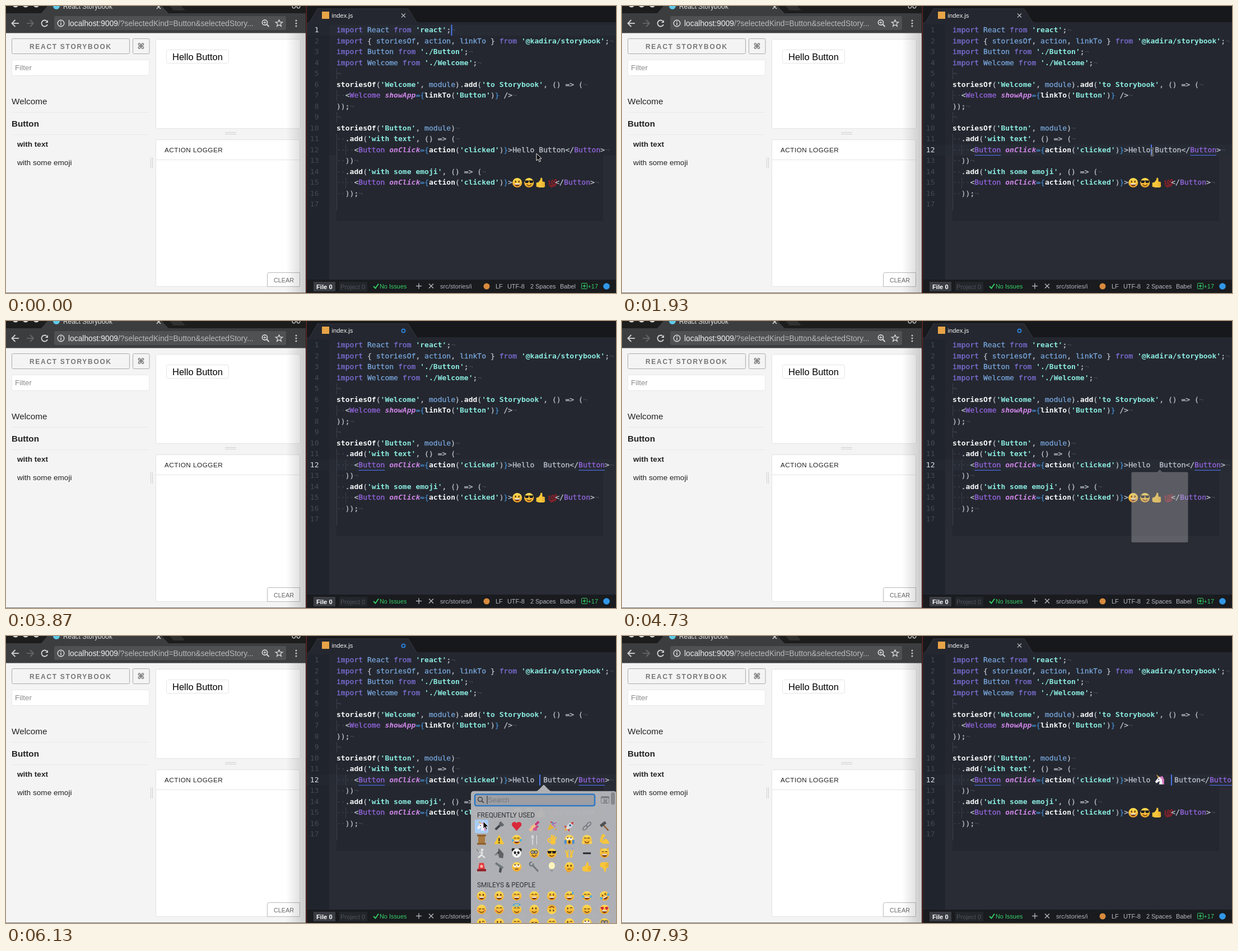
Animation, 1089 px wide and 514 px high, one loop 8000 ms. Source, as an HTML page with a canvas:

```html
<!DOCTYPE html>
<html>
<head>
<meta charset="utf-8">
<style>
html, body { margin: 0; width: 100%; height: 100%; overflow: hidden; background: #24272f; }
canvas { display: block; }
</style>
</head>
<body>
<canvas id="stage" width="1089" height="514"></canvas>
<script>
const g = document.getElementById('stage').getContext('2d');
const SANS = '"Liberation Sans", Arial, sans-serif';
const MONO = '"DejaVu Sans Mono", monospace';
const LOOP = 8000, CHAR = 7.855, ROW = 19.53;
const CLICK = 700, TYPE = 2550, OPEN = 4600, FILL = 5250, PICK = 7200, SPACE = 7600, SAVE = 7750;
const clamp = v => Math.max(0, Math.min(1, v));
const ease = v => { v = clamp(v); return v * v * (3 - 2 * v); };

// ---- drawing helpers
function rect(x, y, w, h, fill, stroke, r = 0) {
  g.beginPath();
  g.roundRect(x, y, w, h, r);
  if (fill) { g.fillStyle = fill; g.fill(); }
  if (stroke) { g.strokeStyle = stroke; g.lineWidth = 1; g.stroke(); }
}
function dot(x, y, r, c, ry = r) {
  g.beginPath();
  g.ellipse(x, y, r, ry, 0, 0, 7);
  g.fillStyle = c;
  g.fill();
}
function arc(x, y, r, a, b, c, w = 1.2) {
  g.beginPath();
  g.arc(x, y, r, a, b);
  g.strokeStyle = c; g.lineWidth = w;
  g.stroke();
}
function trace(pts) {
  g.beginPath();
  for (let i = 0; i < pts.length; i += 2) g.lineTo(pts[i], pts[i + 1]);
}
function line(c, w, ...pts) {
  trace(pts);
  g.strokeStyle = c; g.lineWidth = w;
  g.stroke();
}
function poly(c, ...pts) {
  trace(pts);
  g.fillStyle = c;
  g.fill();
}
function text(s, x, y, size, c, style = '', family = SANS, gap = 0) {
  g.font = `${style} ${size}px ${family}`;
  g.letterSpacing = gap + 'px';
  g.fillStyle = c;
  g.fillText(s, x, y);
}
function place(x, y, angle, draw) {
  g.save();
  g.translate(x, y);
  g.rotate(angle);
  draw();
  g.restore();
}

// ---- emoji, each within -9..9
const INK = '#5a3510', SKIN = '#f7c53b', RED = '#d8283a', STEEL = '#70777d';

// look = eyes, mouth, then optional extras
function face(look) {
  const [eyes, mouth] = look;
  const has = c => look.indexOf(c, 2) > 0;
  const skin = g.createLinearGradient(0, -9, 0, 9);
  skin.addColorStop(0, '#ffdf55');
  skin.addColorStop(1, '#f2a426');
  if (has('r')) g.rotate(Math.PI);
  if (has('l')) g.rotate(-.5);
  if (has('e')) { poly('#eeb030', -8, -2, -7, -10, -1, -6); poly('#eeb030', 8, -2, 7, -10, 1, -6); }
  dot(0, 0, 8.5, skin);
  for (const s of [-1, 1]) {
    const x = 3 * s;
    if (eyes == 'o') dot(x, -2, 1.2, INK, 1.8);
    if (eyes == '^') arc(x, -1.4, 1.9, 3.4, 6, INK);
    if (eyes == '_') arc(x, -2.6, 1.9, .3, 2.8, INK);
    if (eyes == '>') line(INK, 1.2, x + s, -4, x - s, -2.2, x + s, -.6);
    if (eyes == ';') s < 0 ? dot(x, -2, 1.2, INK, 1.8) : arc(x, -1.4, 1.9, 3.4, 6, INK);
    if (eyes == 'h') { dot(4 * s - 1, -3, 1.9, RED); dot(4 * s + 1, -3, 1.9, RED); poly(RED, 4 * s - 2.8, -2.6, 4 * s + 2.8, -2.6, 4 * s, 1.5); }
    if (eyes == 's') poly('#1d1d20', 0, -4, 8 * s, -4, 6.5 * s, .5, 1.5 * s, .5);
    if (eyes == 'g' || eyes == 'u') { dot(x, -2, 2.7, '#fff'); dot(x, eyes == 'u' ? -3.4 : -2, 1.2, INK); }
    if (eyes == 'g') arc(x, -2, 2.8, 0, 7, '#333');
    if (has('t')) dot(7 * s, 1, 1.9, '#45aeea', 2.6);
    if (has('b')) dot(5.5 * s, 2, 1.7, '#ee7a4a');
    if (has('k')) dot(6.5 * s, 5, 2.7, '#ffd34f');
    if (has('f')) dot(7 * s, 4, 2.2, '#4f8fd0', 4);
  }
  if (mouth == 'D') {
    g.beginPath(); g.arc(0, 1.5, 5, 0, Math.PI); g.fillStyle = '#7a3a16'; g.fill();
    rect(-4.4, 1.5, 8.8, 1.8, '#fff');
  }
  if (mouth == ')') arc(0, .8, 4.5, .5, 2.65, INK, 1.3);
  if (mouth == '-') line(INK, 1.3, -3, 4, 3, 4);
  if (mouth == 'O') dot(0, 4, 2, INK, 3);
  if (mouth == '*') { arc(0, 4, 1.4, -1.5, 1.5, INK); dot(5, 4, 2, RED); }
  if (has('n')) { g.beginPath(); g.ellipse(0, -8, 6, 2, 0, 0, 7); g.strokeStyle = '#3fa4e4'; g.lineWidth = 1.6; g.stroke(); }
  if (has('w')) dot(6, -5, 1.7, '#45aeea', 2.5);
  if (has('q')) { dot(-2, 7, 3, '#eba52c'); line('#eba52c', 2, -2, 7, 3, 4.5); }
}
function thumb() {
  poly(SKIN, -8, 0, -4, -1, -1, -5, 0, -9, 2.5, -8.5, 3, -2, 7, -1.5, 7.5, 7, 5, 8.5, -3, 8.5, -8, 7);
  for (const y of [.8, 3.2, 5.6]) line('#d9952a', .8, 2, y, 7.5, y);
}
const objects = {
  unicorn() {
    poly('#f4f1f6', -8, 3, -2, -5, 4, -6, 7, 8, -1, 8, 0, 2, -6, 6);
    poly('#d879c2', 0, -5, 5, -7, 8, -1, 8, 8, 5, 8, 4, -1);
    poly('#e6a94e', -3, -4, -6, -10, 0, -5);
    dot(-2, -1, 1, '#4a3550');
  },
  torch() { place(0, 0, -.75, () => { rect(-9, -2, 11, 4, '#43474b', null, 1); poly('#62676b', 1, -2, 5, -4.5, 8, -4.5, 8, 4.5, 5, 4.5, 1, 2); }); },
  heart() { dot(-4, -3, 4.6, RED); dot(4, -3, 4.6, RED); poly(RED, -8.2, -1, 0, -3, 8.2, -1, 0, 8.5); },
  polish() { line('#f0bd8c', 5.5, -8, 8, 2, -1); line('#f0bd8c', 3, -6, 2, 5, -5); line('#c9387c', 4, 2, -2, 8, -8); line('#c9387c', 3, 2, 3, 7, 0); rect(-2, 3, 7, 5, '#d65594', null, 1); },
  party() {
    poly('#e3b53b', -8, 8, -3, -4, 4, 3);
    ['#d44', '#47b', '#4a5', '#d5a', '#e92'].forEach((c, i) => dot(-1 + i * 2, -7 + i * i * .8, 1.4, c));
    line('#bd55c5', 1.5, 0, -1, 4, -5, 8, -6);
  },
  rocket() { place(0, 0, .78, () => { poly('#d24540', -7, 7, 0, -2, 7, 7); dot(0, -1, 4, '#d5dade', 8.5); poly('#c83737', -3.2, -6, 0, -10.5, 3.2, -6); dot(0, -2, 2, '#3c6f9c'); poly('#f6a92c', -2.5, 7, 2.5, 7, 0, 12); }); },
  link() { place(0, 0, -.78, () => { for (const x of [-4.5, 4.5]) { g.beginPath(); g.ellipse(x, 0, 4.8, 2.6, 0, 0, 7); g.strokeStyle = STEEL; g.lineWidth = 1.6; g.stroke(); } }); },
  hammer() { line('#8b5a34', 2.5, -3, -3, 7, 8); line('#4c5052', 5, -7, 0, 2, -7); },
  scroll() { rect(-6, -7, 12, 14, '#a9793f'); rect(-8, -9, 16, 3, '#8b5d2b', null, 1); rect(-8, 6, 16, 3, '#8b5d2b', null, 1); },
  warning() { poly('#f8c631', 0, -9, 9, 8, -9, 8); line('#222', 2, 0, -3, 0, 3); dot(0, 5.5, 1.2, '#222'); },
  cutlery() { line('#d9dadc', 1.8, -3, -1, -3, 9); line('#d9dadc', 3.6, -3, -8, -3, -2); line('#8d9094', 1.4, 3, -8, 3, 9); line('#d9dadc', 1.6, 4, -8, 4, 9); },
  okay() {
    for (const [x, y] of [[0, -9], [4, -8], [8, -5]]) line(SKIN, 2.8, x / 2, 3, x, y);
    dot(2, 4, 4.8, SKIN);
    arc(-3.5, 1, 3.3, 0, 7, SKIN, 2.4);
  },
  muscle() { line(SKIN, 4.5, -3, -7, -6, 2, -2, 5, 8, 5); dot(2, 3, 4.3, SKIN); dot(-2, -7, 3, SKIN); },
  fencer() { dot(1, -6, 2.4, '#e6e6e6'); line('#e6e6e6', 3, 1, -3, 0, 3, -6, 8); line('#e6e6e6', 2.5, 0, 3, 6, 8); line('#ddd', 1.6, 1, -2, -5, -2); line('#555', .8, -5, -2, -9, -8); },
  wolf() { poly('#5e6264', -9, 4, -2, -3, -1, -9, 3, -5, 8, 1, 7, 9, 0, 8, -1, 4); poly('#939799', -9, 4, -2, 0, 0, 4); dot(-1, -1, .9, '#111'); },
  panda() {
    for (const s of [-1, 1]) dot(6 * s, -6, 3, '#222');
    dot(0, 0, 8, '#f6f6f6');
    for (const s of [-1, 1]) dot(3 * s, -1, 2.1, '#222', 2.7);
    dot(0, 3, 1.6, '#222', 1);
  },
  raise() { for (const s of [-1, 1]) { line(SKIN, 4, 3 * s, 8, 4 * s, 0); line(SKIN, 2, 3 * s, 0, 2 * s, -6); line(SKIN, 2, 5 * s, 0, 7 * s, -6); line('#4d8bd0', 1, 5 * s, -7, 6 * s, -9); } },
  minus() { rect(-7, -1.5, 14, 3, '#27292b'); },
  siren() { poly('#e5383c', -6, 5, -4, -7, 4, -7, 6, 5); rect(-8, 4, 16, 4, '#8d2026'); dot(0, -1, 2.6, '#ffb5a8'); },
  pistol() { place(0, 0, .6, () => { rect(-9, -4, 16, 4, STEEL); poly('#4b5054', 1, 0, 6, 0, 9, 7, 5, 8); }); },
  wrench() { line(STEEL, 3, -3, -3, 7, 8); arc(-5, -5, 3.3, -.3, 5, STEEL, 2.3); },
  bulb() { dot(0, -2, 5.5, '#fff4bd', 6.5); rect(-2.5, 4, 5, 4.5, '#9b9ea0', null, 1); },
  up: thumb,
  down() { g.rotate(Math.PI); g.scale(-1, 1); thumb(); },
  hundred() { place(0, 0, -.2, () => { text('100', -8.5, 2, 10, '#b01f29', 'bold italic'); line('#b01f29', 1.6, -7, 4.5, 7, 3.5); line('#b01f29', 1.4, -5, 7, 5, 6); }); }
};
function emoji(name, x, y) {
  place(x, y, 0, () => objects[name] ? objects[name]() : face(name));
}
const frequent = `unicorn torch heart polish party rocket link hammer
scroll warning ^Dt cutlery okay uOf ^)k muscle
fencer wolf panda g)x s) raise minus ^De
siren pistol u- wrench bulb o-q up down`.split(/\s/);
const smileys = `oD oD ^D ^Dx >D ^Dw ^Dt >Dtl
_)b ^)b ^)n o) o)r ;) _) hD
;* o* ^* _* ^)b ;D uD g)`.split(/\s/);

// ---- code: segments split by |, first letter picks the ink
const ink = {
  k: '#7b70d8', v: '#78a6dc', p: '#bcc2cc', s: '#8aeae0', f: '#f7f8fa', t: '#9466e0',
  a: '#cf86e8', b: '#4387c9', w: '#414754'
};
const weight = { f: 'bold', s: 'bold', a: 'italic bold' };
const imports = (name, from) => `kimport |v${name} |kfrom |s'${from}'|p;`;
const OPEN_TAG = "w····|p<|tButton |aonClick|b={|faction|p(|s'clicked'|p)|b}|p>";
const CLOSE_TAG = '|p</|tButton|p>';
const code = [
  imports('React', 'react'),
  "kimport |p{ |vstoriesOf|p, |vaction|p, |vlinkTo |p} |kfrom |s'@kadira/storybook'|p;",
  imports('Button', './Button'),
  imports('Welcome', './Welcome'),
  '',
  "fstoriesOf|p(|s'Welcome'|p, |vmodule|p).|fadd|p(|s'to Storybook'|p, () => (",
  "w··|p<|tWelcome |ashowApp|b={|flinkTo|p(|s'Button'|p)|b}|p />",
  'p));',
  '',
  "fstoriesOf|p(|s'Button'|p, |vmodule|p)",
  "w··|p.|fadd|p(|s'with text'|p, () => (",
  '',
  'w··|p))',
  "w··|p.|fadd|p(|s'with some emoji'|p, () => (",
  OPEN_TAG + '|eoD s) up hundred' + CLOSE_TAG,
  'w··|p));'
];
function codeLine(src, n, underline) {
  let x = 590;
  const y = 47 + n * ROW;
  for (const part of src.split('|')) {
    const kind = part[0], s = part.slice(1);
    if (kind == 'e') {
      const names = s.split(' ');
      names.forEach((name, i) => emoji(name, x + 8.5 + 21 * i, y - 4));
      x += 19 * names.length;
      continue;
    }
    if (!kind) continue;
    text(s, x, y, 13.05, ink[kind], weight[kind], MONO);
    if (!weight[kind] && kind != 'w') {
      // a hairline gives the plain text its medium weight
      g.strokeStyle = ink[kind]; g.lineWidth = .3;
      g.strokeText(s, x, y);
    }
    if (underline && kind == 't') rect(x, y + 5, s.trim().length * CHAR, 1.2, '#4a68dc');
    x += s.length * CHAR;
  }
  if (n < 16) text('¬', x, y, 13.05, ink.w, '', MONO);
}

// ---- browser window
function browser() {
  rect(0, 0, 536, 514, '#f4f4f4');
  rect(0, 0, 536, 14, '#1d1d1e');
  poly('#3c3d3f', 62, 14, 74, 0, 278, 0, 291, 14);
  poly('#303031', 292, 0, 313, 0, 320, 8, 299, 8);
  rect(0, 13, 536, 35.5, '#3c3d3f');
  for (const x of [17, 35, 54]) dot(x, -3, 5.5, '#d8d8d8');
  dot(90, 0, 6, '#5fc9e8');
  text('React Storybook', 102, 5, 11.9, '#e2e2e2');
  line('#ddd', 1.4, 269, -2, 276, 5);
  line('#ddd', 1.4, 276, -2, 269, 5);
  arc(514, 1, 2.8, 0, 7, '#ddd');
  arc(522, 1, 2.8, 0, 7, '#ddd');
  line('#d4d4d4', 1.8, 23, 31, 11, 31);
  line('#d4d4d4', 1.8, 16.5, 25, 10.5, 31, 16.5, 37);
  line('#666', 1.8, 37, 31, 49, 31);
  line('#666', 1.8, 43, 25, 49, 31, 43, 37);
  arc(69, 31, 5.5, .4, 5.4, '#d4d4d4', 1.8);
  poly('#d4d4d4', 70, 30, 75, 30, 75, 25);
  rect(86, 18, 414, 25, '#505153', null, 3);
  arc(98, 31, 5.8, 0, 7, '#ddd', 1.4);
  rect(97.2, 30, 1.6, 4.5, '#ddd');
  rect(97.2, 27, 1.6, 1.7, '#ddd');
  text('localhost:9009', 111, 35.5, 13.8, '#f0f0f0');
  text('/?selectedKind=Button&selectedStory...', 111 + 6.448 * 13.8, 35.5, 13.8, '#b9b9b9');
  arc(462, 29.5, 4.6, 0, 7, '#ddd', 1.6);
  line('#ddd', 2, 465.5, 33, 469.5, 37);
  line('#ddd', 1.1, 459.5, 29.5, 464.5, 29.5);
  line('#ddd', 1.1, 462, 27, 462, 32);
  const star = [];
  for (let i = 0; i <= 10; i++) {
    const r = i % 2 ? 2.8 : 6.5, a = i * Math.PI / 5;
    star.push(487.5 + r * Math.sin(a), 31 - r * Math.cos(a));
  }
  line('#ddd', 1.3, ...star);
  for (const y of [26, 31, 36]) dot(518, y, 1.5, '#c8c8c8');

  rect(10.5, 58.5, 210, 27, '#f4f4f4', '#ababab', 2);
  text('REACT STORYBOOK', 42, 77, 12, '#777', 'bold', SANS, 1.7);
  rect(226.5, 58.5, 29.5, 27, '#f4f4f4', '#ababab', 2);
  text('⌘', 234.5, 77, 14, '#666', 'bold', '"DejaVu Sans", sans-serif');
  rect(10.5, 96.5, 245, 28, '#fff', '#e9e9e9', 2);
  text('Filter', 16, 115, 13.5, '#8c8c8c');
  text('Welcome', 10, 176, 15.3, '#222');
  text('Button', 10, 216, 15.2, '#222', 'bold');
  text('with text', 20, 252, 13.56, '#222', 'bold');
  text('with some emoji', 20, 285, 13.6, '#222');
  rect(10, 190, 246, 1, '#e9e9e9');
  rect(10, 230, 246, 1, '#e9e9e9');
  for (const x of [258, 261]) rect(x, 271, 1, 20, '#cfcfcf');
  for (const y of [226, 229]) rect(391, y, 20, 1, '#cfcfcf');

  rect(267.5, 59.5, 258, 160, '#fff', '#e2e2e2', 3);
  rect(286.5, 78.5, 111, 24, '#fff', '#e4e4e4', 3);
  text('Hello Button', 297, 97, 16.5, '#000');
  rect(267.5, 239.5, 257, 263, '#fff', '#e2e2e2', 3);
  text('ACTION LOGGER', 283, 261.5, 11.8, '#222', '', SANS, .45);
  rect(268, 275, 256, 1, '#e5e5e5');
  rect(466.5, 477.5, 58, 25, '#fff', '#b9b9b9', [3, 0, 0, 0]);
  text('CLEAR', 478, 495, 10.8, '#666');
  const shade = g.createLinearGradient(500, 0, 536, 0);
  shade.addColorStop(0, '#0000');
  shade.addColorStop(1, '#0000002c');
  rect(500, 48, 36, 466, shade);
  rect(0, 513, 536, 1, '#777');
}

// ---- editor window
function editor(t) {
  const clicked = t >= CLICK, typed = t >= TYPE, picked = t >= PICK;
  const row = clicked ? 11 : 0, top = 33.5 + row * ROW;
  rect(536, 0, 553, 514, '#292b35');
  rect(577, 33, 512, 234, '#24272f');
  rect(590, 267, 476, 118, '#24272f');
  rect(537, 33, 40, 457, '#20242c');
  rect(537, 0, 552, 33, '#17181b');
  rect(537, 29, 552, 4, '#24272f');
  poly('#24272f', 542, 30, 556, 5, 718, 5, 733, 30);
  line('#383b42', 1, 542, 29, 556, 5, 718, 5, 733, 29);
  rect(564, 10, 13, 13, '#e7a447');
  text('index.js', 581.5, 20.5, 11.2, '#f3f3f3');
  if (typed && t < SAVE) arc(709.5, 17.5, 3, 0, 7, '#2a7cd4', 2);
  else { line('#b5b8bd', 1.3, 706, 13.5, 713, 20.5); line('#b5b8bd', 1.3, 713, 13.5, 706, 20.5); }

  rect(537, top, 40, ROW, '#222730');
  rect(577, top, 512, ROW, '#272b34');
  const guide = (x, a, b) => rect(x, 33.5 + a * ROW, 1, (b - a) * ROW, '#3a3f4a');
  guide(590, 4, 5); guide(590, 6, 7); guide(590, 8, 9); guide(590, 10, 17);
  guide(606, 11, 12); guide(606, 14, 15);
  g.textAlign = 'right';
  for (let i = 0; i < 17; i++) text(i + 1, 558.5, 47 + i * ROW, 13.05, i == row ? '#dfe2e7' : '#434955', '', MONO);
  g.textAlign = 'left';
  let body = '|pHello' + (typed ? ' ' : '');
  if (picked) body += '|eunicorn|p' + (t >= SPACE ? ' ' : '');
  code[11] = OPEN_TAG + body + ' Button' + CLOSE_TAG;
  code.forEach((src, i) => codeLine(src, i, clicked && i == 11));

  const since = t >= SPACE ? SPACE : picked ? PICK : typed ? TYPE : clicked ? CLICK : 0;
  if (Math.floor((t - since) / 412) % 2 == 0) {
    const x = t >= SPACE ? 980 : picked ? 972 : typed ? 952 : clicked ? 944 : 794.5;
    rect(x, top, 2, ROW, '#4a78ee');
  }

  rect(537, 490, 552, 24, '#191b1f');
  rect(549, 494, 39, 17, '#3a3d43');
  rect(595, 494, 50, 17, '#23262b');
  text('File 0', 554, 506.5, 11.2, '#fff', 'bold');
  text('Project 0', 597, 506.5, 11.2, '#50545b');
  line('#37d067', 1.8, 656, 502, 659.5, 505.5, 665, 497.5);
  text('No Issues', 667, 506, 10.9, '#37d067');
  line('#b4b7bc', 1.4, 732, 501.5, 742, 501.5);
  line('#b4b7bc', 1.4, 737, 496.5, 737, 506.5);
  line('#b4b7bc', 1.4, 755, 497.5, 763, 505.5);
  line('#b4b7bc', 1.4, 763, 497.5, 755, 505.5);
  text('src/stories/i', 775, 506, 11.2, '#aeb2b8');
  dot(858, 502, 5.5, '#d98a3c');
  [['LF', 874], ['UTF-8', 895], ['2 Spaces', 936], ['Babel', 989]].forEach(([s, x]) => text(s, x, 506, 10.9, '#b6bac0'));
  rect(1027.5, 496.5, 10, 10, null, '#37d067', 1);
  line('#37d067', 1.3, 1029.5, 501.5, 1035.5, 501.5);
  line('#37d067', 1.3, 1032.5, 498.5, 1032.5, 504.5);
  text('+17', 1038.5, 506, 10.9, '#37d067');
  dot(1072, 502, 5.8, '#3197e8');
  rect(535, 0, 1, 514, '#20191a');
  rect(536, 0, 1, 514, '#7a2a25');
}

// ---- emoji picker
function picker(t) {
  const grow = clamp((t - OPEN) / 337), fade = 1 - clamp((t - PICK) / 200);
  if (!grow || !fade) return;
  g.save();
  g.translate(960, 266);
  g.scale(grow, grow);
  g.translate(-960, -266);
  g.globalAlpha = .97 * grow * fade;
  g.beginPath();
  g.roundRect(830, 277.7, 260, 324, 5);
  g.moveTo(947, 278);
  g.quadraticCurveTo(950, 277, 958, 268);
  g.quadraticCurveTo(960, 265.5, 962, 268);
  g.quadraticCurveTo(970, 277, 973, 278);
  g.fillStyle = '#b4b5b9';
  g.fill();
  g.globalAlpha = fade * clamp((t - FILL) / 130);
  if (g.globalAlpha) {
    rect(836, 283, 215, 21, '#9d9fa4', null, 3);
    g.beginPath(); g.roundRect(837, 283.5, 214, 20.5, 3);
    g.strokeStyle = '#2e78c4'; g.lineWidth = 2.5; g.stroke();
    arc(846.5, 292.5, 3.8, 0, 7, '#333', 1.3);
    line('#333', 1.5, 849.5, 295.5, 853, 299);
    text('Search', 860.5, 298, 12, '#74777b');
    if (Math.floor((t - FILL) / 500) % 2) rect(858.5, 286, 1, 15, '#222');
    rect(1062.5, 287.5, 14, 12, null, '#777a7e', 1);
    rect(1062.5, 287.5, 14, 3, '#777a7e');
    text('⌘', 1065.5, 298.5, 9, '#666', '', '"DejaVu Sans", sans-serif');
    rect(1080, 280, 7, 22, '#85878b', null, 3);
    text('FREQUENTLY USED', 841, 325, 11.9, '#303235', '', 'Roboto, sans-serif');
    text('SMILEYS & PEOPLE', 841, 450, 11.9, '#303235', '', 'Roboto, sans-serif');
    if (t > 5950) rect(837, 329, 24, 24, '#a9cdf5', null, 2);
    const grid = (list, y) => list.forEach((name, i) => emoji(name, 849 + i % 8 * 31.35, y + Math.floor(i / 8) * 24.3));
    grid(frequent, 340.5);
    grid(smileys, 465.5);
  }
  g.restore();
}

function pointer(t) {
  if (t > 350 && t < TYPE) {
    for (const [c, w] of [['#ddd', 2.6], ['#111', 1.1]]) {
      line(c, w, 944, 254.5, 946.5, 256, 949, 254.5);
      line(c, w, 946.5, 256, 946.5, 267);
      line(c, w, 944, 268.5, 946.5, 267, 949, 268.5);
    }
    return;
  }
  if (t >= TYPE && t < 5450 || t >= SPACE) return;
  const p = t < TYPE ? 0 : ease((t - 5450) / 550);
  place(947 - 95 * p, 264 + 68 * p, 0, () => {
    trace([0, 0, 0, 13, 3, 10.3, 5.2, 15, 7.4, 14, 5.3, 9.4, 9.2, 9.2]);
    g.closePath();
    g.fillStyle = '#111'; g.fill();
    g.strokeStyle = '#eee'; g.lineWidth = 1; g.stroke();
  });
}

function frame(now) {
  const t = now % LOOP;
  browser();
  editor(t);
  picker(t);
  pointer(t);
  requestAnimationFrame(frame);
}
requestAnimationFrame(frame);
</script>
</body>
</html>
```
